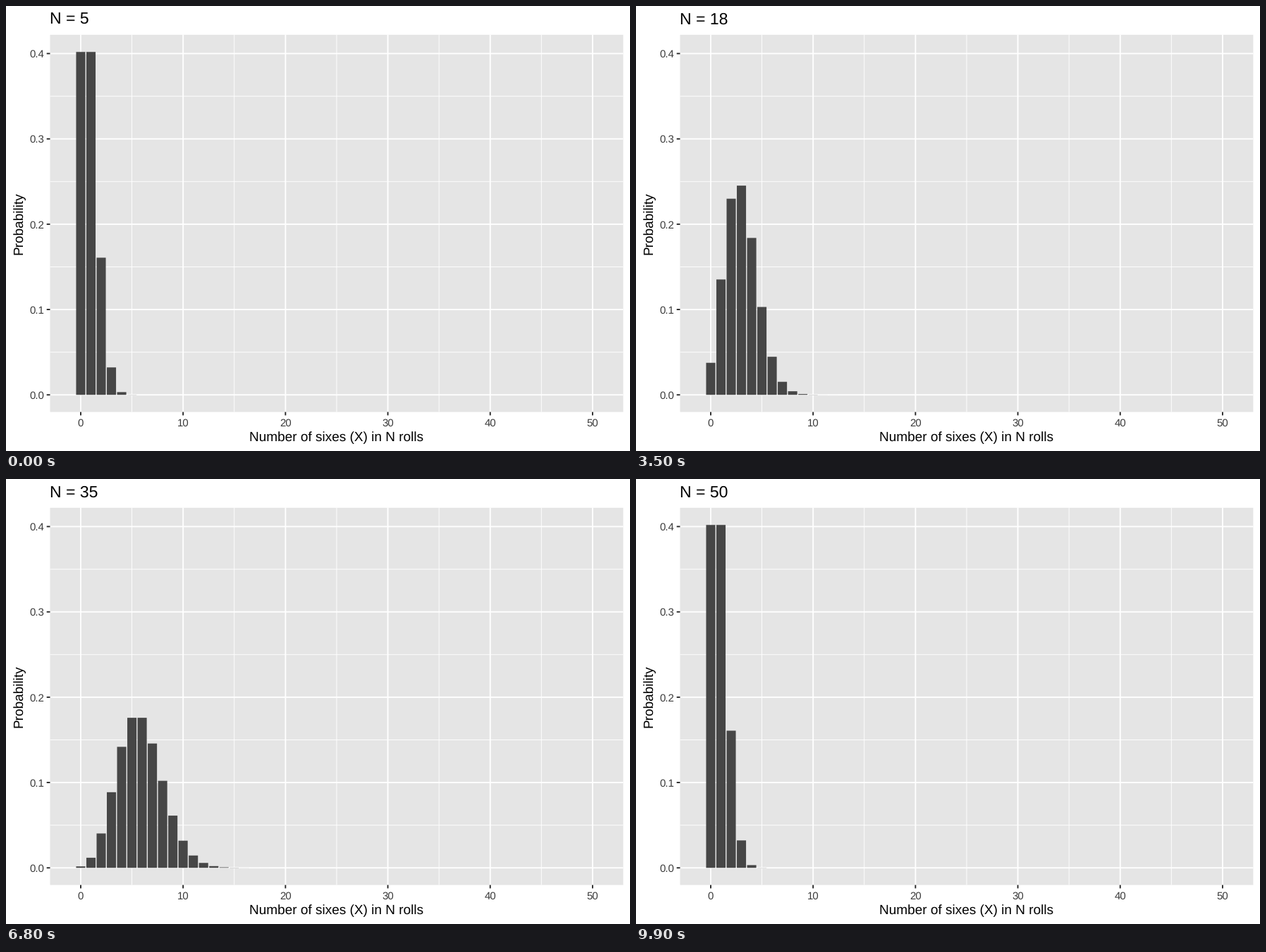
A matplotlib script for the animation above (10 s loop, 885 by 632 pixels).

```python
from math import comb

import matplotlib.pyplot as plt
import numpy as np
from matplotlib.animation import FuncAnimation
from matplotlib.patches import Rectangle

plt.rcParams["font.family"] = "Liberation Sans"
plt.rcParams["text.hinting"] = "none"
plt.rcParams["text.hinting_factor"] = 1

W, H, DPI = 885, 632, 100
PT = 1.745                      # pixels per layout point
LEFT, RIGHT, TOP, BOTTOM = 62.5, 875.4, 40.9, 576.6
FIRST, LAST = 5, 50
PANEL, BAR, TICK, LABEL = "#e5e5e5", "#464646", "#242424", "#3b3b3b"


def pmf(n):
    """Chance of each number of sixes in n rolls, padded to a fixed length."""
    return np.array([comb(n, k) * 5.0 ** (n - k) / 6.0 ** n
                     for k in range(LAST + 1)])


Y_MAX = pmf(FIRST)[0]


def px(x):
    return LEFT + (x + 2.995) / 55.99 * (RIGHT - LEFT)


def py(y):
    return BOTTOM - (y / Y_MAX + 0.05) / 1.1 * (BOTTOM - TOP)


def timeline():
    """List of (title number, bar heights), one entry per frame."""
    steps = [(FIRST, pmf(FIRST))]
    for n in range(FIRST, LAST + 1):
        nxt = FIRST if n == LAST else n + 1
        now, then = pmf(n), pmf(nxt)
        if n in (22, LAST):     # one-frame transitions
            steps.append((n, then))
            continue
        half = (now + then) / 2
        half[n + 1:] = 0        # a new bar only enters on arrival
        steps += [(n, half), (nxt, then)]
        if nxt <= 14:
            steps.append((nxt, then))
    return steps


STEPS = timeline()

fig = plt.figure(figsize=(W / DPI, H / DPI), dpi=DPI, facecolor="white")
ax = fig.add_axes([0, 0, 1, 1])
ax.set_xlim(0, W)
ax.set_ylim(H, 0)
ax.axis("off")


def line(xs, ys, color, width, z):
    ax.plot(xs, ys, color=color, lw=width * 72 / DPI, solid_capstyle="butt",
            snap=False, zorder=z)


def label(x, y, s, size, color="black", **kw):
    return ax.text(x, y, s, fontsize=size * PT * 72 / DPI, color=color,
                   va="baseline", **kw)


def box(x, y, w, h, color, z):
    return ax.add_patch(Rectangle((x, y), w, h, fc=color, lw=0, ec="none",
                                  snap=False, zorder=z))


box(LEFT, TOP, RIGHT - LEFT, BOTTOM - TOP, PANEL, 0)

MAJOR, MINOR, TICK_LEN = 1.86, 0.93, 2.75 * PT

for y in np.arange(0.05, 0.4, 0.1):
    line([LEFT, RIGHT], [py(y)] * 2, "white", MINOR, 1)
for x in range(5, 50, 10):
    line([px(x)] * 2, [TOP, BOTTOM], "white", MINOR, 1)

for i in range(5):
    y = py(i / 10)
    line([LEFT, RIGHT], [y] * 2, "white", MAJOR, 2)
    line([LEFT - TICK_LEN, LEFT], [y] * 2, TICK, MAJOR, 4)
    label(53.9, y + 5.5, f"{i / 10:.1f}", 8.8, LABEL, ha="right")
for v in range(0, 51, 10):
    x = px(v)
    line([x] * 2, [TOP, BOTTOM], "white", MAJOR, 2)
    line([x] * 2, [BOTTOM, BOTTOM + TICK_LEN], TICK, MAJOR, 4)
    label(x, 596.4, str(v), 8.8, LABEL, ha="center")

label((LEFT + RIGHT) / 2, 618.4, "Number of sixes (X) in N rolls", 11,
      ha="center")
label(23.6, (TOP + BOTTOM) / 2, "Probability", 11, ha="center", rotation=90,
      rotation_mode="anchor")
title = label(LEFT - 0.4, 26.2, "", 13.2, ha="left")

bars = [box(px(k - 0.45), py(0), px(0.9) - px(0), 0, BAR, 3)
        for k in range(LAST + 1)]


def draw(i):
    n, heights = STEPS[i]
    title.set_text(f"N = {n}")
    for bar, p in zip(bars, heights):
        bar.set_height(py(p) - py(0))
        bar.set_visible(p > 1e-6)
    return [title, *bars]


anim = FuncAnimation(fig, draw, frames=len(STEPS), interval=100, repeat=True,
                     repeat_delay=0, blit=False)
plt.show()
```
